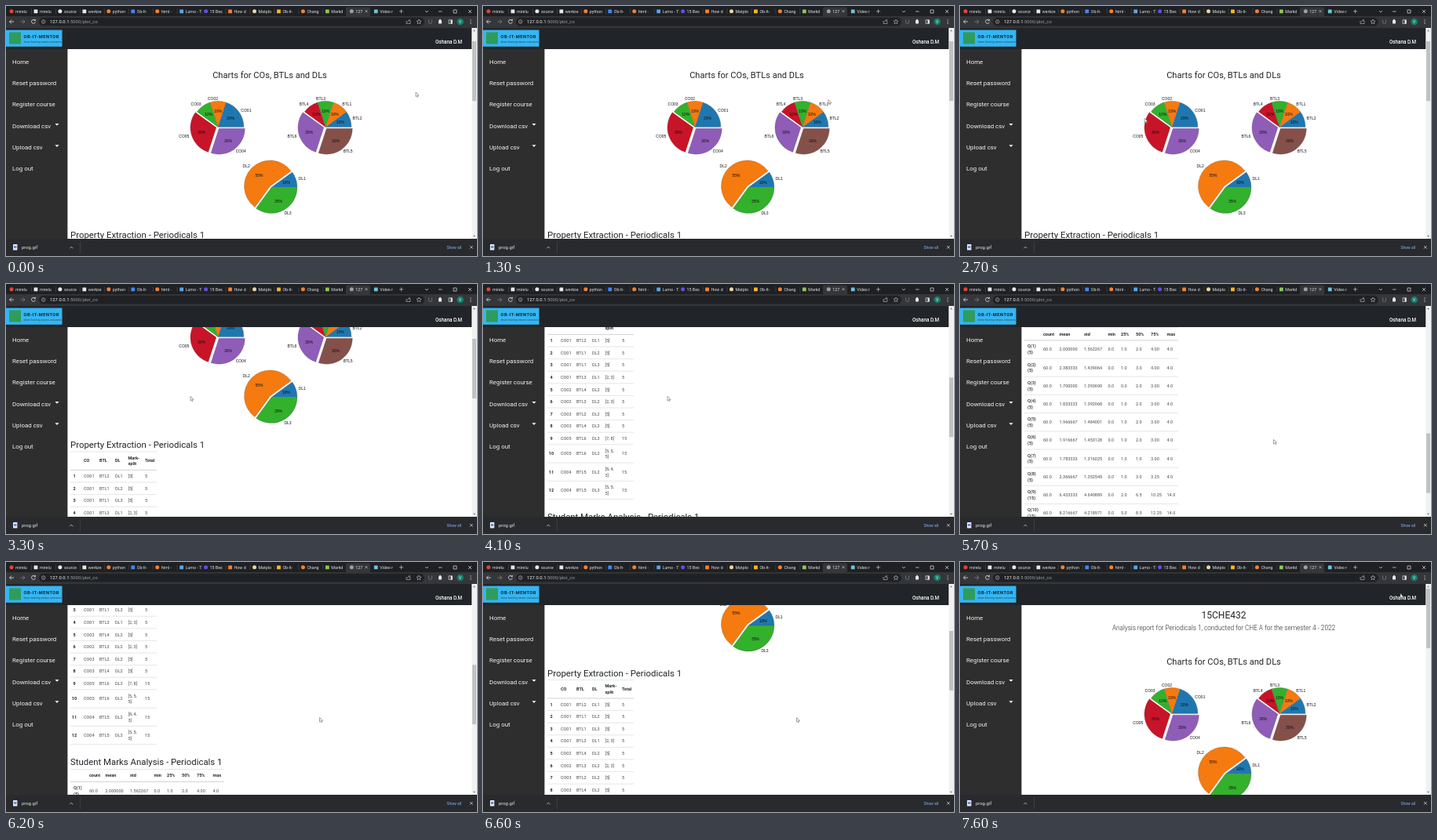
Recreate the animation shown at these times as an HTML page. Size 600 by 319 pixels, loop 7.7 s.

```html
<!DOCTYPE html>
<html lang="en">
<head>
<meta charset="utf-8">
<title>Course charts</title>
<style>
  html, body { margin: 0; width: 100%; height: 100%; overflow: hidden; background: #fff; }
  svg { display: block; width: 100vw; height: 100vh; }
  text { font-family: Roboto, "Open Sans", sans-serif; white-space: pre; }
  .plot { font-family: "Liberation Sans", Arial, sans-serif; }
</style>
</head>
<body>
<svg id="stage" viewBox="0 0 600 319">
  <defs><clipPath id="view"><rect x="78" y="55" width="516" height="242"/></clipPath></defs>
  <g clip-path="url(#view)"><g id="page"></g></g>
  <g id="frame"></g>
  <rect id="thumb" x="594" width="5" height="76" fill="#c1c1c1"/>
  <path id="cursor" d="M0 0V5.6L1.3 4.4L2.2 6.3L3 5.9L2.2 4.1H4Z" fill="#fff" stroke="#666" stroke-width=".6"/>
</svg>
<script>
const LOOP = 7700, STEP = 100;
const $ = id => document.getElementById(id);
const page = $('page'), frame = $('frame');

function add(parent, tag, attrs, content) {
  const el = document.createElementNS('http://www.w3.org/2000/svg', tag);
  for (const k in attrs) el.setAttribute(k, attrs[k]);
  if (content !== undefined) el.textContent = content;
  return parent.appendChild(el);
}
// y is the vertical middle of the capitals
const label = (parent, x, y, str, size, fill, more) =>
  add(parent, 'text', { x, y: y + size * .355, 'font-size': size, fill, ...more }, str);
const box = (x, y, width, height, fill, more) =>
  add(frame, 'rect', { x, y, width, height, fill, ...more });
const stroke = (d, color, width = .7) =>
  add(frame, 'path', { d, fill: 'none', stroke: color, 'stroke-width': width });
const rule = (x1, x2, y, color = '#d3d6d9', width = .6) =>
  add(page, 'path', { d: `M${x1} ${y}H${x2}`, stroke: color, 'stroke-width': width });

// ---- page content ----
const INK = '#212529', BOLD = { 'font-weight': 700 };
const MID = { 'text-anchor': 'middle' };

label(page, 336, 68, '15CHE432', 12, INK, MID);
label(page, 336, 84.5, 'Analysis report for Periodicals 1, conducted for CHE A for the semester 4 - 2022',
  8.2, INK, { ...MID, 'font-weight': 300 });
label(page, 336, 127.3, 'Charts for COs, BTLs and DLs', 11.1, INK, MID);

const COLORS = ['#1f77b0', '#f57a10', '#33b02c', '#c81428', '#8f5cb8', '#85504a'];

// slices: "name percent", a trailing * pulls the slice out
function pie(cx, cy, slices) {
  const R = 33, OUT = 2.2;
  let turn = 0;
  slices.forEach((slice, i) => {
    const [name, share, out] = slice.split(' ');
    const from = turn * Math.PI / 50;
    turn += +share;
    const to = turn * Math.PI / 50, mid = (from + to) / 2;
    const shift = out ? OUT : 0;
    const ox = cx + shift * Math.cos(mid), oy = cy - shift * Math.sin(mid);
    const at = (a, r) => [ox + r * Math.cos(a), oy - r * Math.sin(a)];
    add(page, 'path', {
      d: `M${ox} ${oy}L${at(from, R)}A${R} ${R} 0 ${to - from > Math.PI ? 1 : 0} 0 ${at(to, R)}Z`,
      fill: COLORS[i], stroke: '#555', 'stroke-width': .5, 'stroke-opacity': .5
    });
    const [nx, ny] = at(mid, R * 1.1), [px, py] = at(mid, R * .6);
    label(page, nx, ny, name, 5, '#111',
      { class: 'plot', 'text-anchor': Math.cos(mid) > .001 ? 'start' : 'end' });
    label(page, px, py, share + '%', 5, '#111', { class: 'plot', ...MID });
  });
}
pie(270, 193.4, ['CO01 20', 'CO02 10', 'CO03 10', 'CO05 30 *', 'CO04 30 *']);
pie(407, 193.4, ['BTL2 10', 'BTL1 10', 'BTL3 10', 'BTL4 10', 'BTL6 30 *', 'BTL5 30 *']);
pie(338, 270.5, ['DL1 10', 'DL2 55 *', 'DL3 35']);

const CELL = 5.5, CELL_INK = '#43474b';
// a "/" splits a cell into two lines
function cell(x, y, str, more) {
  const lines = str.split('/');
  lines.forEach((line, i) =>
    label(page, x, y + (i - (lines.length - 1) / 2) * 7.8, line, CELL, more ? INK : CELL_INK, more));
}

label(page, 82, 331, 'Property Extraction - Periodicals 1', 11.4, INK);
const markCols = [99, 119, 139, 155.5, 177];
['CO', 'BTL', 'DL', 'Mark-/split', 'Total'].forEach((h, i) => cell(markCols[i], 351.5, h, BOLD));
rule(82, 192, 340);
rule(82, 192, 363.4, '#c9cccf', .9);
let y = 363.4;
`CO01 BTL2 DL1 [5]
CO01 BTL1 DL2 [5]
CO01 BTL1 DL3 [5]
CO01 BTL3 DL1 [2,_3]
CO02 BTL4 DL2 [5]
CO02 BTL3 DL2 [2,_3]
CO03 BTL2 DL2 [5]
CO03 BTL4 DL2 [5]
CO05 BTL6 DL3 [7,_8]
CO05 BTL6 DL2 [5,_5,/5]
CO04 BTL5 DL2 [8,_4,/3]
CO04 BTL5 DL3 [5,_5,/5]`.split('\n').forEach((line, i) => {
  const h = line.includes('/') ? 23.3 : 15.6, middle = y + h / 2;
  label(page, 87, middle, i + 1, CELL, INK, { ...BOLD, ...MID });
  [...line.split(' '), i < 8 ? '5' : '15'].forEach((s, c) => cell(markCols[c], middle, s.replace('_', ' ')));
  y += h;
  rule(82, 192, y);
});

label(page, 82, 596, 'Student Marks Analysis - Periodicals 1', 11.4, INK);
const statCols = [106, 126.5, 158, 188.5, 205, 224, 243, 263.5];
['count', 'mean', 'std', 'min', '25%', '50%', '75%', 'max'].forEach((h, i) => cell(statCols[i], 613.5, h, BOLD));
rule(82, 278, 605.5);
rule(82, 278, 621.4, '#c9cccf', .9);
`2.000000 1.562267 1.0 2.0 4.00
2.383333 1.439064 1.0 3.0 4.00
1.700000 1.393690 0.0 2.0 3.00
1.833333 1.392068 1.0 2.0 3.00
1.966667 1.484001 1.0 2.0 3.00
1.916667 1.453128 1.0 2.0 3.00
1.783333 1.316025 1.0 1.0 3.00
2.366667 1.352545 1.0 3.0 3.25
6.433333 4.640889 2.0 6.5 10.25
8.216667 4.218971 5.0 8.5 12.25
6.716667 4.650831 3.0 6.0 11.00
6.850000 4.512083 3.0 7.0 11.00`.split('\n').forEach((line, i) => {
  const middle = 633 + i * 23.2, long = i > 7;
  const [mean, std, ...quarters] = line.split(' ');
  cell(86, middle, `Q(${i + 1})/(${long ? 15 : 5})`, { 'font-weight': 500 });
  ['60.0', mean, std, '0.0', ...quarters, long ? '14.0' : '4.0'].forEach((s, c) => cell(statCols[c], middle, s));
  rule(82, 278, middle + 11.6);
});

// ---- browser frame ----
const GREY = '#c4c7cb';
box(0, 0, 600, 13, '#1f2023');
box(0, 13, 600, 15, '#35363a');
box(433, 1.5, 31, 12, '#35363a', { rx: 2 });

const tabs = [
  ['mirelu', '#d9483b'], ['mirelu', '#e8e8e8'], ['source', '#e8e8e8'], ['werkze', '#e8e8e8'],
  ['python', '#ef8236'], ['Ob-It-', '#4285f4'], ['html -', '#ef8236'], ['Lumo - T', '#58a6e8'],
  ['15 Bes', '#6a4be0'], ['How d', '#ef8236'], ['Matplo', '#e8d9a0'], ['Ob-It-', '#f4b62c'],
  ['Chang', '#ef8236'], ['Markd', '#8ac65a'], ['127', '#9aa0a6'], ['Video r', '#6fc3d8']
];
tabs.forEach(([name, color], i) => {
  const x = 7 + i * 30.95;
  if (i % 2) box(x - 2.4, 4.4, 4.8, 4.8, color, { rx: .5 });
  else add(frame, 'circle', { cx: x, cy: 6.8, r: 2.5, fill: color });
  label(frame, x + 5, 6.8, name, 5.3, '#dfe1e5');
  if (i < 13) stroke(`M${x + 25.5} 3.5V10`, '#55585c', .5);
});
stroke('M457.5 5.2l3 3m0-3l-3 3M501 6.8h5M503.5 4.3v5', GREY);
stroke('M534 6l2 2l2-2M551 7h4.5M570 5h4v4h-4zM589 5l4 4m0-4l-4 4', '#e4e6e9');

box(42, 14.8, 491, 10.8, '#202124', { rx: 5.4 });
stroke('M10 20H4.5M7 17.5L4.5 20L7 22.5', '#e4e6e9', .8);
stroke('M18.5 20H24M21.5 17.5L24 20L21.5 22.5', '#80848a', .8);
stroke('M37 18.3A2.5 2.5 0 1 0 37.4 20.6M37.4 16.8V18.7H35.5', '#e4e6e9', .8);
stroke('M45.4 20a2.3 2.3 0 1 0 4.6 0a2.3 2.3 0 1 0 -4.6 0M47.7 19.5v1.9M47.7 18.3v.6', GREY, .6);
const url = label(frame, 56, 20.2, '127.0.0.1', 5.9, '#f1f3f4');
add(url, 'tspan', { fill: '#9aa0a6' }, ':5000/plot_co');
stroke('M510 19v3.5h5v-3.5M511.5 20.5q.5-2.5 3-2.5m-1-1.3l1.3 1.3l-1.3 1.3', GREY, .6);
stroke('M526 17l.9 2l2.1.2l-1.6 1.4l.5 2.1l-1.9-1.1l-1.9 1.1l.5-2.1l-1.6-1.4l2.1-.2z', GREY, .6);
stroke('M538.5 17.5v3q0 2 2 2t2-2v-3', '#777b80', .8);
box(551, 18, 4, 4.5, '#e4e6e9', { rx: .6 });
add(frame, 'circle', { cx: 553, cy: 17.8, r: 1, fill: '#e4e6e9' });
stroke('M564 17.8h4.4v4.6h-4.4z', '#e4e6e9');
box(566.5, 17.8, 2, 4.6, '#e4e6e9');
add(frame, 'circle', { cx: 578.7, cy: 20, r: 4.3, fill: '#12806e' });
label(frame, 578.7, 20, 'V', 5, '#fff', MID);
[17.8, 20, 22.2].forEach(cy => add(frame, 'circle', { cx: 592, cy, r: .6, fill: '#e4e6e9' }));

// ---- site header and side menu ----
box(0, 28, 593.5, 27, '#212529');
box(0, 55, 78.4, 242, '#2e2e2e');
box(0, 30.6, 71.5, 21.2, '#35b6f2');
box(4, 33.5, 15, 15, '#2f9c5c');
label(frame, 22.5, 39.2, 'OB-IT-MENTOR', 5.7, '#12232e', { ...BOLD, 'letter-spacing': .5 });
label(frame, 22.5, 46, 'share learning means outcomes', 3.4, '#1d4a63');
label(frame, 581, 45.5, 'Oshana D.M', 6.3, '#fff', { 'text-anchor': 'end', 'font-weight': 500 });
['Home', 'Reset password', 'Register course', 'Download csv', 'Upload csv', 'Log out'].forEach((item, i) => {
  const middle = 71 + i * 27.3;
  label(frame, 8, middle, item, 7.9, '#f4f4f4');
  if (item.endsWith('csv'))
    add(frame, 'path', { d: `M62.4 ${middle - 3}h5.2l-2.6 2.8z`, fill: '#f4f4f4' });
});

// ---- scrollbar track and download bar ----
box(593.5, 28, 6.5, 269, '#f1f1f1');
add(frame, 'path', { d: 'M595 32.2h3l-1.5-1.9zM595 292.8h3l-1.5 1.9z', fill: '#777' });
box(0, 297, 600, 22, '#292a2d');
box(9, 304, 5.4, 7.5, '#e8eaed', { rx: .6 });
box(10, 306, 3.4, 3, '#5b8def');
label(frame, 20, 308, 'prog.gif', 5.9, '#e8eaed');
stroke('M81.3 309.2l2-2l2 2', '#e8eaed');
stroke('M94.5 300.5v15', '#4a4d51', .6);
label(frame, 561.5, 307.8, 'Show all', 5, '#8ab4f8');
stroke('M591 306l3.6 3.6m0-3.6l-3.6 3.6', '#e8eaed');

// ---- motion ----
const linear = p => p, smooth = p => p * p * (3 - 2 * p);
function track(keys, t, ease) {
  const i = keys.findIndex(k => k[0] > t);
  if (i < 0) return keys[keys.length - 1].slice(1);
  if (i === 0) return keys[0].slice(1);
  const a = keys[i - 1], b = keys[i], p = ease((t - a[0]) / (b[0] - a[0]));
  return a.slice(1).map((v, c) => v + (b[c + 1] - v) * p);
}
const scrollKeys = [[2800, 39], [3300, 126], [4100, 299], [4800, 573], [5000, 633],
  [5500, 633], [6200, 341], [7100, 0]];
const cursorKeys = [[700, 522, 110], [2400, 235, 143.3], [5000, 235, 143.3],
  [5500, 399.5, 198.5], [6900, 399.5, 198.5], [7500, 561, 40.3]];

function draw(time) {
  const t = Math.floor(time % LOOP / STEP) * STEP;
  const [scroll] = track(scrollKeys, t, linear);
  const [x, y] = track(cursorKeys, t, smooth);
  page.setAttribute('transform', `translate(0 ${-scroll})`);
  $('thumb').setAttribute('y', 34 + scroll * .285);
  $('cursor').setAttribute('transform', `translate(${x} ${y})`);
}

const start = performance.now();
function tick() {
  draw(performance.now() - start);
  requestAnimationFrame(tick);
}
tick();
</script>
</body>
</html>
```
